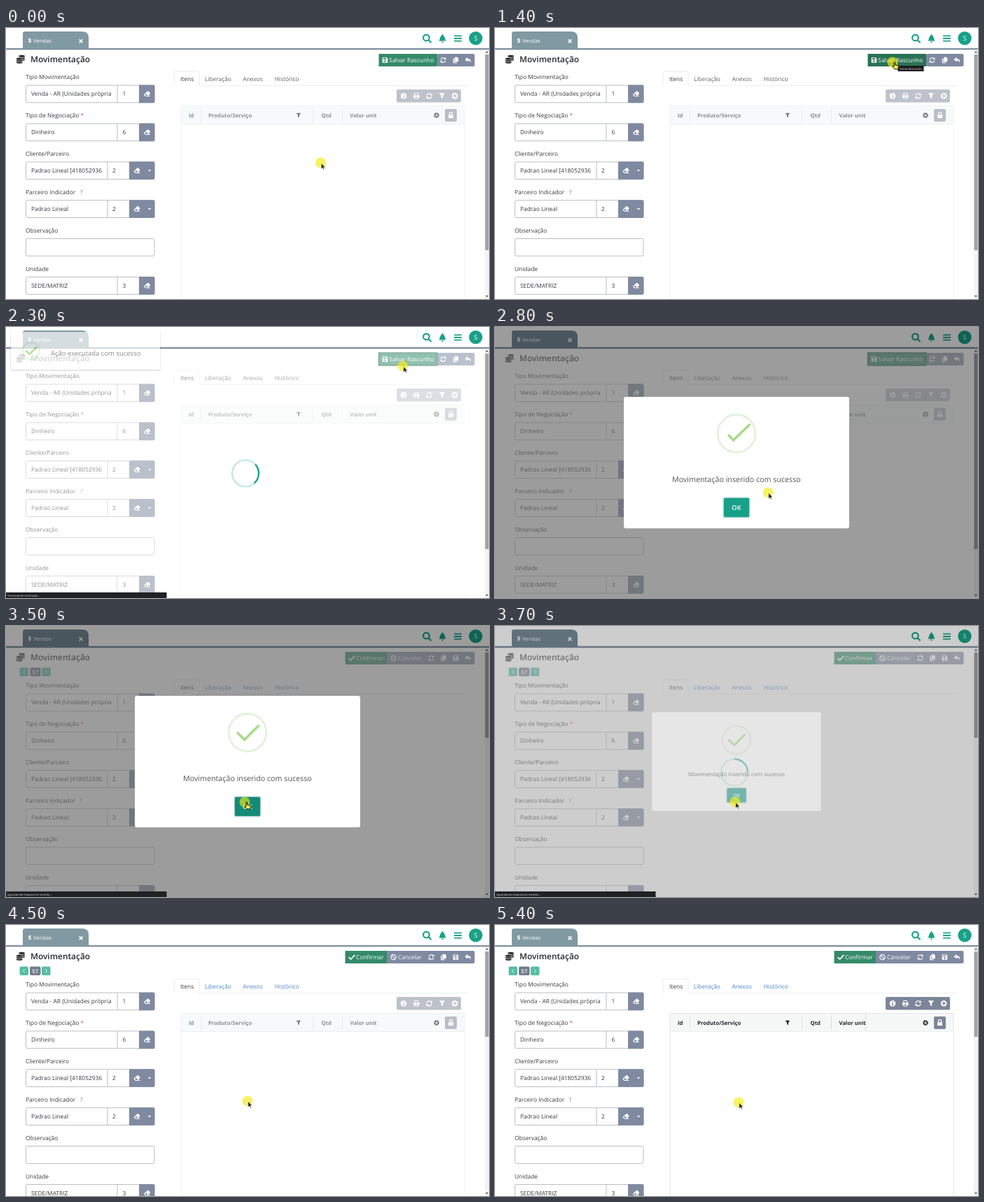
These frames come from a looping animation (690 px wide and 388 px high, 5900 ms). An HTML page:

```html
<!DOCTYPE html>
<html lang="pt">
<head>
<meta charset="utf-8">
<title>Movimentação</title>
<style>
html, body { margin: 0; width: 100%; height: 100%; overflow: hidden; background: #fff; }
svg { display: block; width: 100vw; height: 100vh; }
text { font-family: "Open Sans", "Noto Sans", sans-serif; text-rendering: geometricPrecision; white-space: pre; }
</style>
</head>
<body>
<svg id="stage" viewBox="0 0 690 388" xmlns="http://www.w3.org/2000/svg"></svg>
<script>
const LOOP = 5900, STEP = 100, PITCH = 54.9;
const SLATE = '#7f8aa1', GREEN = '#348b6a', TEAL = '#18a188', INK = '#373a3f';

// ---- markup helpers
const rect = (x, y, w, h, fill, extra = '') =>
  `<rect x="${x}" y="${y}" width="${w}" height="${h}" fill="${fill}" ${extra}/>`;
const text = (x, y, s, size = 8.4, fill = INK, weight = 400, extra = '') =>
  `<text x="${x}" y="${y}" font-size="${size}" fill="${fill}" font-weight="${weight}" ${extra}>${s}</text>`;
const line = (d, color, width = 1, extra = '') =>
  `<path d="${d}" fill="none" stroke="${color}" stroke-width="${width}" ${extra}/>`;
const group = (id, body, extra = '') => `<g id="${id}" ${extra}>${body}</g>`;

// icons live in a box from -6 to 6 and use currentColor
const S = 'fill="none" stroke="currentColor"';
const ICONS = {
  search: `<g ${S} stroke-width="2"><circle cx="-1" cy="-1" r="4"/><path d="M2 2L5.6 5.6"/></g>`,
  bell: '<path d="M-5 3.6C-3.4 2-3.8-4.6 0-4.8C3.8-4.6 3.4 2 5 3.6ZM-1.6 4.4H1.6A1.6 1.6 0 0 1-1.6 4.4ZM-.7-6H.7V-4H-.7Z"/>',
  bars: '<path d="M-5.4-4.6H5.4V-2.8H-5.4ZM-5.4-.9H5.4V.9H-5.4ZM-5.4 2.8H5.4V4.6H-5.4Z"/>',
  save: '<path fill-rule="evenodd" d="M-5-5H3L5-3V5H-5ZM-3.4-3.6V-1H2V-3.6ZM0 .4A1.7 1.7 0 1 0 .01 .4Z"/>',
  refresh: `<g ${S} stroke-width="1.7"><path d="M-4.4-.8A4.4 4.4 0 0 1 3.4-2.8M4.4 .8A4.4 4.4 0 0 1-3.4 2.8"/></g><path d="M5.2-5.2V-.9H.9ZM-5.2 5.2V.9H-.9Z"/>`,
  copy: '<path d="M-2-5.6H3L5-3.6V3H-2ZM-5-3H-3V4H2V5.6H-5Z"/>',
  reply: '<path d="M-5.6-1L-.8-5.2V-2.6C4-2.6 6 0 4 4.8C4 1.4 2.4 .6-.8 .6V3.2Z"/>',
  eraser: '<path fill-rule="evenodd" d="M-5.4 1L.6-4.8H2.4L5.4-1.6V0L1.8 3.4H5.4V4.6H-2.6L-5.4 2ZM-3.6 1.6L-1.8 3.4H.2L1.4 2.2L-1.4-.6Z"/>',
  caret: '<path d="M-3-1.5H3L0 1.8Z"/>',
  info: '<path fill-rule="evenodd" d="M0-5.4A5.4 5.4 0 1 0 .01-5.4ZM-.9-3.4H.9V-1.7H-.9ZM-1.4-.8H.9V2.3H1.5V3.4H-1.5V2.3H-.9V.3H-1.4Z"/>',
  plus: '<path fill-rule="evenodd" d="M0-5.4A5.4 5.4 0 1 0 .01-5.4ZM-.9-3.2H.9V-.9H3.2V.9H.9V3.2H-.9V.9H-3.2V-.9H-.9Z"/>',
  print: '<path fill-rule="evenodd" d="M-3.6-5.4H2.6L3.6-4.4V-1.2H5.4V3H3.6V5.2H-3.6V3H-5.4V-1.2H-3.6ZM-2.3-4V-1H2.3V-4ZM-2.3 1.7V3.9H2.3V1.7Z"/>',
  filter: '<path d="M-5.2-5H5.2L1.5-.4V5L-1.5 3V-.4Z"/>',
  gear: `<circle r="3.3" ${S} stroke-width="2"/><circle r="4.8" ${S} stroke-width="1.9" stroke-dasharray="1.9 1.87"/>`,
  lock: `<rect x="-4.4" y="-.6" width="8.8" height="6" rx="1"/><path d="M-2.6-.6V-2.4A2.6 2.6 0 0 1 2.6-2.4V-.6" ${S} stroke-width="1.5"/>`,
  check: `<path d="M-4.8 .2L-1.6 3.4L4.8-3.4" ${S} stroke-width="2"/>`,
  ban: `<g ${S} stroke-width="1.5"><circle r="4.6"/><path d="M-3.2-3.2L3.2 3.2"/></g>`,
  close: `<path d="M-3-3L3 3M3-3L-3 3" ${S} stroke-width="1.9"/>`,
  left: `<path d="M1.6-3.2L-1.6 0L1.6 3.2" ${S} stroke-width="1.3"/>`,
  right: `<path d="M-1.6-3.2L1.6 0L-1.6 3.2" ${S} stroke-width="1.3"/>`,
};
const icon = (name, x, y, scale = .75, color = '#fff') =>
  `<g transform="translate(${x} ${y}) scale(${scale})" color="${color}" fill="${color}">${ICONS[name]}</g>`;

// ---- page parts
const label = (i, s) => text(28, 73.2 + i * PITCH, s);

function field(i, value, code, wide) {
  const y = 82 + i * PITCH, mid = y + 12.4;
  const split = wide ? 145 : 159, btn = wide ? 176 : 190;
  let out = rect(28.5, y, 183.5, 24.8, '#fff', 'rx="2" stroke="#b9bec3"');
  if (!code) return out;
  out += line(`M${split} ${y}v24.8`, '#b9bec3');
  out += `<path d="M${btn} ${y - .5}H210.5a2 2 0 0 1 2 2v21.8a2 2 0 0 1-2 2H${btn}Z" fill="${SLATE}"/>`;
  out += text(36, mid + 3, value, 8.4, INK, 400, `clip-path="url(#clip${wide ? 'W' : 'N'})"`);
  out += text(wide ? 152 : 166.5, mid + 3, code);
  out += icon('eraser', wide ? 187 : 201.5, mid, .8);
  if (wide) out += icon('caret', 205, mid, .75);
  return out;
}

// two stacks of coins, the right one behind
const stack = (x, y) => [2, 1, 0].map(i =>
  `<ellipse cx="${x}" cy="${y + i * 2.5}" rx="4.6" ry="1.9" fill="#222" stroke="#fff" stroke-width=".6"/>`).join('');
const coins = stack(22.6, 40.3) + stack(19.2, 44.2);

const form =
  label(0, 'Tipo Movimentação') + field(0, 'Venda - AR (Unidades própria', '1') +
  label(1, 'Tipo de Negociação <tspan fill="#d9536f">*</tspan>') + field(1, 'Dinheiro', '6') +
  label(2, 'Cliente/Parceiro') + field(2, 'Padrao Lineal [418052936', '2', true) +
  label(3, 'Parceiro Indicador') + text(106, 237.9, '?', 7.8, '#6a7078') +
  field(3, 'Padrao Lineal', '2', true) +
  label(4, 'Observação') + field(4) +
  label(5, 'Unidade') + field(5, 'SEDE/MATRIZ', '3');

const tabs = line('M240 82.5V64a2 2 0 0 1 2-2H274a2 2 0 0 1 2 2V82.5', '#e9ebed') +
  line('M276 82.5H660', '#eef0f1') + text(249, 76, 'Itens') +
  group('links', ['Liberação', 'Anexos', 'Histórico'].map((s, i) =>
    text([284, 338.4, 383.7][i], 76, s, 8.4, 'currentColor')).join(''));

function table(on) {
  const bar = on ? '#7c8698' : '#bdc2cb', ink = on ? '#24272b' : '#8b9095';
  const tools = ['info', 'print', 'refresh', 'filter', 'plus'];
  const head = (x, s) => text(x, 127.8, s, 7.75, ink, 700);
  return rect(558, 88, 92, 18.5, bar, 'rx="2"') +
    tools.map((n, i) => icon(n, 568 + i * 18.3, 97.3, .8)).join('') +
    rect(250, 111.5, 405, 26, on ? '#f6f7f7' : '#f7fafa') +
    line('M250 111.5H655V400M250 111.5V400', on ? '#e3e5e6' : '#eff2f2') +
    line('M250 137.5H655', '#eceff0') +
    line('M278.5 114V135M438.5 114V135M480.5 114V135' + (on ? 'M529.5 112V137' : ''), on ? '#dcdfe1' : '#e9edee') +
    head(261, 'Id') + head(289, 'Produto/Serviço') + head(450.5, 'Qtd') + head(491.5, 'Valor unit') +
    icon('filter', 418, 125, .65, on ? '#24272b' : '#777c81') +
    icon('gear', 615, 125, .7, on ? '#24272b' : '#6c7176') +
    rect(627, 116, 17, 18, on ? '#7c8698' : '#b9bec9', 'rx="2"') + icon('lock', 635.5, 124.7, .8);
}

const draftBar = rect(616, 37, 53.5, 18, SLATE, 'rx="2"') +
  rect(532.5, 37, 83.5, 18, GREEN, 'id="save" stroke-width="1.5"') +
  icon('save', 541.5, 46) + text(547.3, 49.2, 'Salvar Rascunho', 8.35, '#fff') +
  icon('refresh', 624.5, 46) + icon('copy', 642.5, 46) + icon('reply', 660, 46, .8);

const finalBar = rect(540, 37, 129.5, 18, SLATE, 'rx="2"') + rect(484.5, 37, 59.5, 18, GREEN) +
  icon('check', 494, 46, .9) + text(500, 49.2, 'Confirmar', 8.35, '#fff') +
  icon('ban', 553.5, 46, .8) + text(560, 49.2, 'Cancelar', 8.35, '#fff') +
  icon('refresh', 607.5, 46) + icon('copy', 625, 46) + icon('save', 642.5, 46) + icon('reply', 660, 46, .8) +
  rect(19.5, 59.5, 12.5, 12.5, '#55bda3', 'rx="2"') + icon('left', 25.7, 65.8) +
  rect(34, 59.5, 15.5, 12.5, '#737d8e', 'rx="2"') + text(37.3, 68.7, '57', 7.6, '#fff', 600) +
  rect(51, 59.5, 12.5, 12.5, '#55bda3', 'rx="2"') + icon('right', 57.4, 65.8);

const header = rect(0, 0, 690, 29, '#fff') + rect(0, 28.8, 690, 2.4, '#8091a1') +
  '<path id="tab" d="M24 30V8a3 3 0 0 1 3-3H108C115 5 118 8 118 14V30Z"/>' +
  text(31.5, 21.3, '$', 8.6, '#fff', 700) + text(39, 21.1, 'Vendas', 7.6, '#fff') + icon('close', 107, 18.7, .8) +
  icon('search', 601.5, 15, 1.08, TEAL) + icon('bell', 623.5, 15, 1, TEAL) + icon('bars', 645.5, 15, 1, TEAL) +
  `<circle cx="671" cy="14.6" r="9.7" fill="${TEAL}"/>` + text(671, 18, 'S', 9.2, '#fff', 400, 'text-anchor="middle"');

const scrollbar = rect(684, 31.5, 6, 357, '#f3f3f3') + rect(684.5, 38, 5, 280, '#a0a2a4', 'id="thumb"') +
  '<path d="M685 35.5H689L687 33ZM685 383H689L687 385.5Z" fill="#555"/>';

const spinner = '<circle cx="342" cy="209.5" r="19" fill="none" stroke="#bfe6dd" stroke-width="2.2"/>' +
  line('M328.56 196.06A19 19 0 0 1 355.44 196.06', TEAL, 2.3, 'id="arc"');

const toast = rect(5.5, 7, 216, 56, '#000', 'rx="4" opacity=".07"') + rect(6.5, 8.5, 214, 54.5, '#000', 'rx="3" opacity=".08"') +
  rect(7, 7, 213, 54, '#fff', 'rx="3"') +
  '<circle cx="36" cy="34" r="12" fill="none" stroke="#e0f1d6" stroke-width="2.2"/>' +
  line('M29 34.5L33.5 39L43 29.5', '#92d46d', 2.6, 'stroke-linecap="round"') +
  text(64, 41, 'Ação executada com sucesso', 9.5, '#545454');

const modal = rect(184, 100, 322, 188.3, '#fff', 'rx="3"') +
  '<circle cx="345" cy="152.5" r="27" fill="none" stroke="#e4f2da" stroke-width="2.8"/>' +
  line('', '#a5dc86', 3.4, 'id="mark" pathLength="1" stroke-dasharray="1 2" stroke-linecap="round"') +
  text(253, 222.4, 'Movimentação inserido com sucesso', 10.72, '#545454') +
  rect(325.5, 243.5, 39, 30, '#b4d3dc', 'rx="3"') + rect(327, 245, 36, 27, TEAL, 'rx="2" id="ok"') +
  text(345, 262.4, 'OK', 9.3, '#fff', 600, 'text-anchor="middle"');

const cursor = '<circle id="glow" r="7.5" fill="#f3ee1c"/>' +
  '<path id="arrow" transform="translate(.8 .6) scale(.88)" d="M0 0V9.5L2.3 7.4L3.8 10.6L5.3 9.9L3.8 6.9H6.8Z" fill="#222" stroke="#fff" stroke-width=".6"/>' +
  '<path id="hand" d="M2 .6C2-.4 3.6-.4 3.6 .6V4L7.6 4.8C8.6 5 8.6 6 8.4 7L7.6 10H3L0 6.4C-.4 5.4 .8 5 2 6.4Z" fill="#f6ee4a" stroke="#111" stroke-width="1"/>';

document.getElementById('stage').innerHTML =
  `<defs><clipPath id="clipN"><rect width="152" height="420"/></clipPath>
   <clipPath id="clipW"><rect width="138" height="420"/></clipPath></defs>` +
  rect(0, 0, 690, 388, '#fff') + coins + text(35, 49.2, 'Movimentação', 11.9, '#26292d', 600) +
  group('body', form + tabs + group('tableOff', table(false)) + group('tableOn', table(true))) +
  group('draft', draftBar) + group('final', finalBar) +
  rect(0, 31, 684, 357, '#fff', 'id="veil"') + header + scrollbar + group('spin', spinner) +
  rect(0, 0, 690, 388, '#000', 'id="shade"') + group('toast', toast) + group('modal', modal) +
  group('tip', rect(575.5, 54, 37, 8, '#1c1c1c') + text(578, 59.6, 'Salvar Rascunho', 4.15, '#ddd')) +
  group('status', rect(0, 380, 229.5, 8, '#202124') + text(2, 385.8, '', 3.9, '#e4e4e4', 400, 'id="message"')) +
  group('cursor', cursor);

// ---- motion
const $ = id => document.getElementById(id);
const set = (id, name, value) => $(id).setAttribute(name, value);
const show = (id, on) => set(id, 'display', on ? 'inline' : 'none');
const within = (t, a, b) => t >= a && t < b;
const ramp = (t, a, b) => Math.min(1, Math.max(0, (t - a) / (b - a)));
const mix = (a, b, k) => a + (b - a) * k;
const smooth = k => k * k * (3 - 2 * k);

// time, x, y
const PATH = [[500, 449.5, 193], [1000, 568, 49], [1500, 568, 49], [1800, 567, 56], [2500, 567, 56],
  [2800, 390, 237], [3200, 341, 252], [3600, 341, 252], [3800, 345, 252], [5200, 345, 252], [5400, 348, 254]];

function pointer(t) {
  let [, x, y] = PATH[0];
  for (let i = 1; i < PATH.length; i++) {
    const [ta] = PATH[i - 1], [tb, bx, by] = PATH[i];
    const k = smooth(ramp(t, ta, tb));
    x = mix(x, bx, k);
    y = mix(y, by, k);
  }
  return [x, y];
}

// dialog pop: grow past full size, dip, settle
function pop(k) {
  if (k < .45) return mix(.7, 1.05, k / .45);
  if (k < .8) return mix(1.05, .95, (k - .45) / .35);
  return mix(.95, 1, (k - .8) / .2);
}

function render(t) {
  const renewed = t >= 3000;
  set('body', 'transform', `translate(0 ${renewed ? 15 : 0})`);
  show('draft', !renewed);
  show('final', renewed);
  set('links', 'color', renewed ? '#4a86c5' : '#5c6167');
  show('tableOff', !renewed || within(t, 4400, 4800));
  show('tableOn', t >= 4800);
  set('thumb', 'height', renewed ? 122 : 280);
  set('tab', 'fill', within(t, 2400, 4200) ? '#778c9a' : '#8199a2');

  const hover = within(t, 1000, 1600), press = within(t, 3200, 3700);
  set('save', 'fill', hover ? '#2a7256' : GREEN);
  set('save', 'stroke', t >= 1500 ? '#1f6650' : 'none');
  set('ok', 'fill', press ? '#148b75' : TEAL);
  show('tip', within(t, 1400, 1600));

  set('veil', 'opacity', .46 * ramp(t, 1400, 1700) * (1 - ramp(t, 4200, 4500)));
  show('spin', within(t, 1600, 4400));
  set('arc', 'transform', `rotate(${45 + (t - 2200) / 750 * 360} 342 209.5)`);

  const closing = 1 - ramp(t, 3600, 3800);
  set('toast', 'opacity', ramp(t, 1700, 2000) * (1 - ramp(t, 2200, 2500)));
  set('shade', 'opacity', .39 * ramp(t, 2300, 2500) * closing);
  const size = t < 3600 ? pop(ramp(t, 2400, 2700)) : mix(.5, 1, closing);
  set('modal', 'opacity', ramp(t, 2300, 2500) * closing);
  set('modal', 'transform', `translate(345 194) scale(${size}) translate(-345 -194)`);
  const k = ramp(t, 2800, 3000);
  set('mark', 'd', `M${mix(334, 331, k)} ${mix(155, 153, k)}L340.5 ${mix(162, 163, k)}L${mix(363.5, 360.5, k)} ${mix(140, 143, k)}`);
  set('mark', 'stroke-dashoffset', 1 - ramp(t, 2500, 2800));

  const sending = within(t, 2000, 2500);
  show('status', sending || within(t, 3000, 4400));
  $('message').textContent = sending ? 'Processando solicitação...' : 'Aguardando resposta do servidor...';

  const [x, y] = pointer(t), hand = hover || press;
  set('cursor', 'transform', `translate(${x} ${y})`);
  set('glow', 'opacity', press ? .6 : .68);
  show('arrow', !hand);
  show('hand', hand);
}

function tick(now) {
  render(Math.floor(now % LOOP / STEP) * STEP);
  requestAnimationFrame(tick);
}
render(0);
requestAnimationFrame(tick);
</script>
</body>
</html>
```
